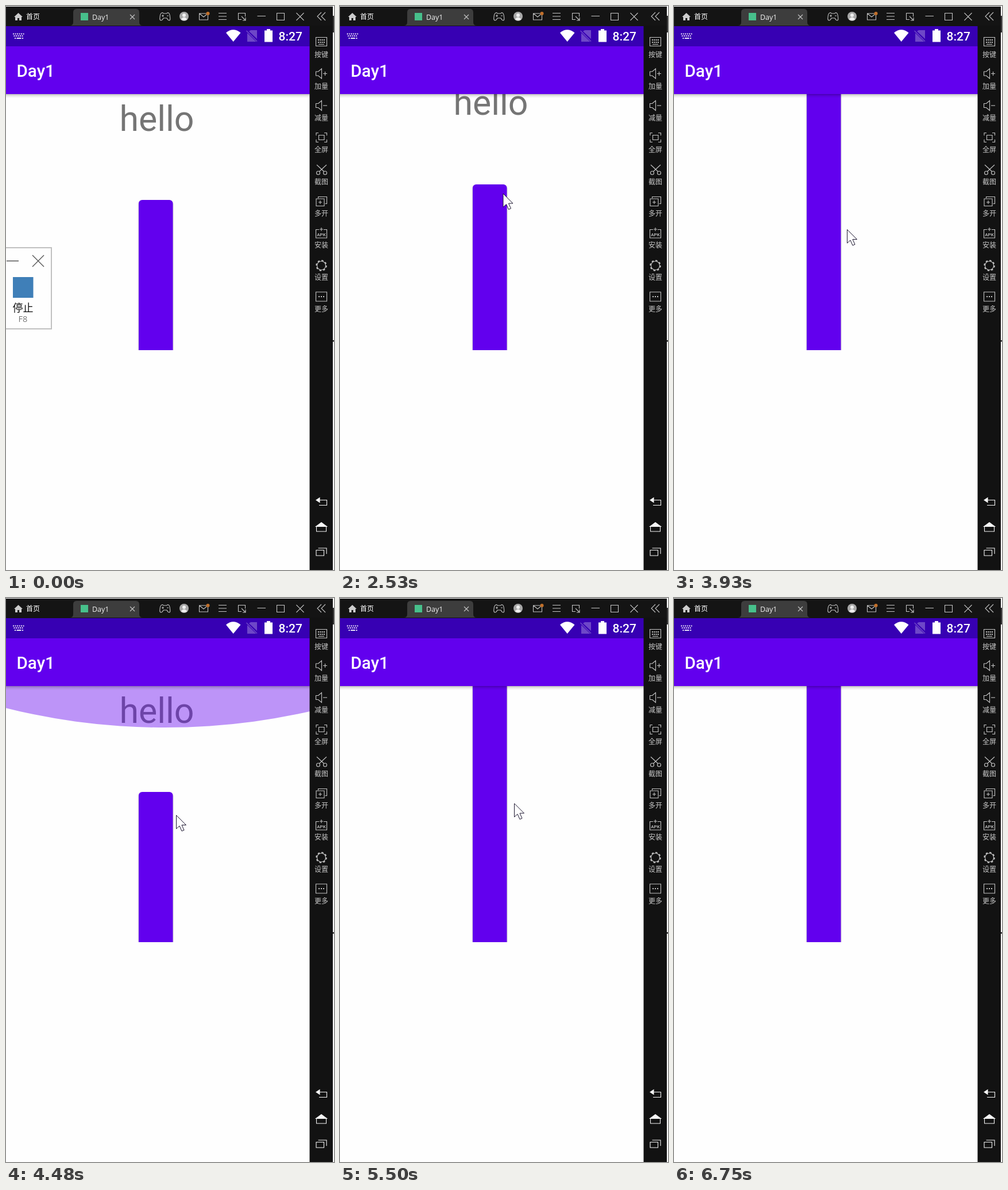
Recreate the animation shown at these times as an HTML page. Size 571 by 980 pixels, loop 7030 ms.

```html
<!DOCTYPE html>
<html lang="zh">
<head>
<meta charset="utf-8">
<title>Day1</title>
<style>
  html, body { margin: 0; height: 100%; overflow: hidden; background: #fefefe; }
  svg { display: block; width: 571px; height: 980px; }
  text { font-family: "Noto Sans CJK SC", "Noto Sans CJK", sans-serif; }
  .app { font-family: Roboto, sans-serif; }
  .tab { font-family: "Open Sans", sans-serif; }
  .line { fill: none; stroke: #c4c4c4; stroke-width: 1.1; }
  .white { stroke: #f4f4f4; }
  .label { fill: #c8c8c8; font-size: 12px; text-anchor: middle; }
</style>
</head>
<body>
<svg viewBox="0 0 571 980">
  <defs>
    <clipPath id="view"><rect y="153" width="529" height="445"/></clipPath>
    <linearGradient id="shade" x2="0" y2="1">
      <stop stop-color="#000" stop-opacity=".26"/>
      <stop offset=".45" stop-color="#000" stop-opacity=".09"/>
      <stop offset="1" stop-color="#000" stop-opacity="0"/>
    </linearGradient>
    <filter id="soft" x="-20%" width="140%"><feGaussianBlur stdDeviation="1.3"/></filter>
  </defs>

  <!-- scrolling content -->
  <g clip-path="url(#view)">
    <g id="content">
      <text class="app" x="197.500" y="216.500" font-size="60.8" fill="#757575">hello</text>
      <rect x="231" y="338.500" width="59.500" height="1200" rx="6" opacity=".36" filter="url(#soft)"/>
      <rect x="231" y="337" width="59.500" height="1200" rx="6" fill="#6200ee"/>
    </g>
    <g fill="#6200ee">
      <ellipse id="topGlow" cx="276.500" rx="793"/>
      <ellipse id="bottomGlow" cx="272" rx="793"/>
    </g>
  </g>
  <rect y="153" width="529" height="7" fill="url(#shade)"/>

  <!-- app and status bars -->
  <rect y="70" width="529" height="83" fill="#6200ee"/>
  <rect y="34" width="529" height="36" fill="#3700b3"/>
  <text class="app" x="18.500" y="122.500" font-size="29.6" font-weight="500" fill="#fff">Day1</text>
  <g fill="#fff">
    <path d="M383 46.500Q395.500 36 408.500 46.500L395.700 62Z"/>
    <path d="M450 42.500h4v-2.500h6v2.500h4v20h-14z"/>
    <path d="M426 42h11v15l-14-13zM420 47l15.500 15h-15.500z" opacity=".28"/>
    <path d="M418.500 43l18.500 18.500" stroke="#fff" stroke-width="1.500" opacity=".28"/>
    <text class="app" x="474.500" y="60" font-size="21" font-weight="500">8:27</text>
  </g>
  <g stroke="#e8e2f6" stroke-width="2">
    <path d="M12 48.500h20M13.500 52h17" stroke-dasharray="2 1.500"/>
    <path d="M15 56h2m1.500 0h8m1.500 0h2"/>
  </g>

  <!-- window title bar -->
  <rect y="1" width="569" height="34" fill="#141414"/>
  <path d="M111 34q6 0 6-6V11q0-6 6-6h103q6 0 6 6v17q0 6 6 6z" fill="#3d3d3d"/>
  <path d="M14 19l7.500-7 7.500 7h-2v6h-4v-4h-3v4h-4v-6z" fill="#ccc"/>
  <text x="35" y="23" font-size="12" fill="#fff">首页</text>
  <rect x="130" y="12" width="13" height="13" fill="#47c08b"/>
  <text class="tab" x="150" y="24" font-size="12.500" fill="#f2f2f2">Day1</text>
  <g class="line">
    <path d="M216 15l8 8m0-8l-8 8"/>
    <path d="M271 12q2-1 3 1h6q1-2 3-1 2 1 2.500 7 1 6-1.500 6-2 0-4-4h-6q-2 4-4 4-3 0-2-6 .5-6 3-7zM271 17h4m-2-2v4m7-2h3"/>
    <path d="M336.500 13h15v11h-15zl7.500 6 7.500-6"/>
    <path d="M370 12.500h14m-14 5.500h14m-14 5.500h14"/>
    <path d="M410 23.500h-5.500v-11h12v6M410 18l7 7m0-5v5h-5"/>
    <path d="M437.500 17.500h14.500M471.500 12.500h13v12h-13zM505.500 12l13 13m0-13l-13 13"/>
    <path d="M549 11l-7 7 7 7m7-14l-7 7 7 7"/>
  </g>
  <circle cx="310" cy="18" r="8" fill="#a8a8a8"/>
  <g fill="#f0f0f0"><circle cx="310" cy="16" r="3"/><path d="M304.500 23q5.500-7 11 0-5.500 4-11 0z"/></g>
  <circle cx="351.500" cy="13" r="3" fill="#c2702a"/>

  <!-- side bar -->
  <rect x="528.500" y="34" width="40.500" height="946" fill="#121212"/>
  <rect x="569" y="17" width="2" height="29" fill="#333"/>
  <rect x="569" y="581" width="2" height="2"/>
  <g id="labels"></g>
  <g class="line">
    <path d="M539.500 54.500h19v15h-19z"/>
    <path d="M543 59h12m-12 4h12" stroke-width="2" stroke-dasharray="2 1.300"/><path d="M544 66.500h10"/>
    <path id="speaker" d="M539.500 114h4l6-5v17l-6-5h-4z"/><path d="M552 117.500h7m-3.500-3.500v7"/>
    <use href="#speaker" y="55.500"/><path d="M552 173h7"/>
    <path d="M540 225v-4.500h4m10 0h4.500v4.500m0 7v4.500h-4.500m-10 0h-4v-4.500M544.500 224.500h9.500v8h-9.500z"/>
    <path d="M541 276l13 12m4-12l-13 12"/>
    <circle cx="543.500" cy="290" r="3"/><circle cx="555.500" cy="290" r="3"/>
    <path d="M540 335h14v12.500h-14zM543.500 334v-2.500h15v12h-3M547 338v6m-3-3h6"/>
    <path d="M545 388.500h-5.500v14.500h19v-14.500h-5.500M549 385v6m-3-3h6"/>
    <circle cx="549" cy="451" r="7.500"/>
    <circle cx="549" cy="451" r="8.700" stroke-width="2" stroke-dasharray="3.400 3.430"/>
    <path d="M539.500 497h19v16h-19z"/>
    <path d="M544 505h2m2 0h2m2 0h2" stroke-width="2"/>
  </g>
  <text class="app" x="549" y="400" font-size="8" font-weight="500" fill="#c4c4c4" text-anchor="middle">APK</text>
  <g class="line white">
    <path d="M545 858.500h13.500v9h-13.500"/><path d="M546 854.500v8l-6-4z" fill="#f4f4f4"/>
    <path d="M540.500 904.500v8.500h17v-8.500"/><path d="M539.500 904.500l9.500-7 9.500 7z" fill="#f4f4f4"/>
    <path d="M540 945.500h13.500v9.500h-13.500zM543.500 942h14.500v10"/>
  </g>

  <!-- recorder panel -->
  <g id="panel">
    <path d="M0 420h79v141h-79" fill="#fefefe" stroke="#c0c0c0" stroke-width="2"/>
    <path d="M1 443h21M46 433l20 20m0-20l-20 20" stroke="#555" stroke-width="1.400"/>
    <rect x="12" y="471" width="35.500" height="36" fill="#3f7fb8"/>
    <text x="11.500" y="530.500" font-size="18" fill="#111">停止</text>
    <text class="tab" x="29.500" y="549" font-size="14.500" fill="#777" text-anchor="middle">F8</text>
  </g>

  <path id="cursor" d="M0 0v23.500l5.500-5 4 9 4-1.700-4-8.800h7.500z" fill="#fff" stroke="#1c1630"/>
</svg>
<script>
const LOOP = 7030, FRAME = 50, OFFSET = 20;
const TOP = 153, BOTTOM = 598, SCROLL = 300;
const RADIUS = 793, GLOW = 106;
const $ = id => document.getElementById(id);

const names = "按键 加量 减量 全屏 截图 多开 安装 设置 更多".split(" ");
$("labels").innerHTML = names
  .map((name, i) => `<text class="label" x="549" y="${88.5 + i * 55.3}">${name}</text>`).join("");

const mix = (a, b, p) => a + (b - a) * p;
const progress = (t, from, to) => Math.min(1, Math.max(0, (t - from) / (to - from)));
const ease = (t, from, to) => {
  const p = progress(t, from, to);
  return p * p * (3 - 2 * p);
};

// Page pulled up, back down past its top, then up past its end.
const scrollAt = t => SCROLL * (ease(t, 2480, 2750) - ease(t, 4240, 4460) + ease(t, 5030, 5280));

// Overscroll glow: fast rise, slow fall; dir is 1 at the top edge and -1 at the bottom.
function drawGlow(node, edge, dir, t, from, to) {
  const scale = .75 * Math.sin(Math.PI * Math.sqrt(progress(t, from, to)));
  node.setAttribute("cy", edge + dir * (GLOW - RADIUS) * scale);
  node.setAttribute("ry", Math.max(0, RADIUS * scale));
  node.setAttribute("opacity", Math.max(0, .617 * scale));
}

// The pointer swings out of the left edge and back.
function swing(t) {
  const p = progress(t, 440, 1130), reach = Math.sin(Math.PI * p);
  return [347 * reach, mix(530, 500, p) - 186 * reach];
}

// Later it rests briefly at a few places: time, x, y.
const stops = [
  [2020, 272, 300], [2530, 284, 326], [3930, 301.5, 388.5], [4480, 296.5, 377.5],
  [5480, 303.5, 357], [6380, 266, 390], [6640, 0, 480]
];
function wander(t) {
  const i = Math.max(1, stops.findIndex(s => s[0] > t));
  const [from, x0, y0] = stops[i - 1], [to, x1, y1] = stops[i];
  const p = ease(t, from, to);
  return [mix(x0, x1, p), mix(y0, y1, p)];
}

function draw(time) {
  const t = time % LOOP;
  const step = Math.floor((t + OFFSET) / FRAME) * FRAME - OFFSET;
  $("content").setAttribute("transform", `translate(0 ${-scrollAt(step)})`);
  drawGlow($("topGlow"), TOP, 1, step, 4390, 5080);
  drawGlow($("bottomGlow"), BOTTOM, -1, step, 5730, 6730);
  $("panel").setAttribute("opacity", t < 1560 ? 1 : t < 1610 ? .5 : 0);

  const entering = t >= 440 && t < 1180, working = t >= 2020 && t < 6640;
  const [x, y] = entering ? swing(step) : wander(step);
  $("cursor").setAttribute("transform", `translate(${x} ${y})`);
  $("cursor").setAttribute("opacity", entering || working ? 1 : 0);
}

let start;
function tick(now) {
  start ??= now;
  draw(now - start);
  requestAnimationFrame(tick);
}
draw(0);
requestAnimationFrame(tick);
</script>
</body>
</html>
```
